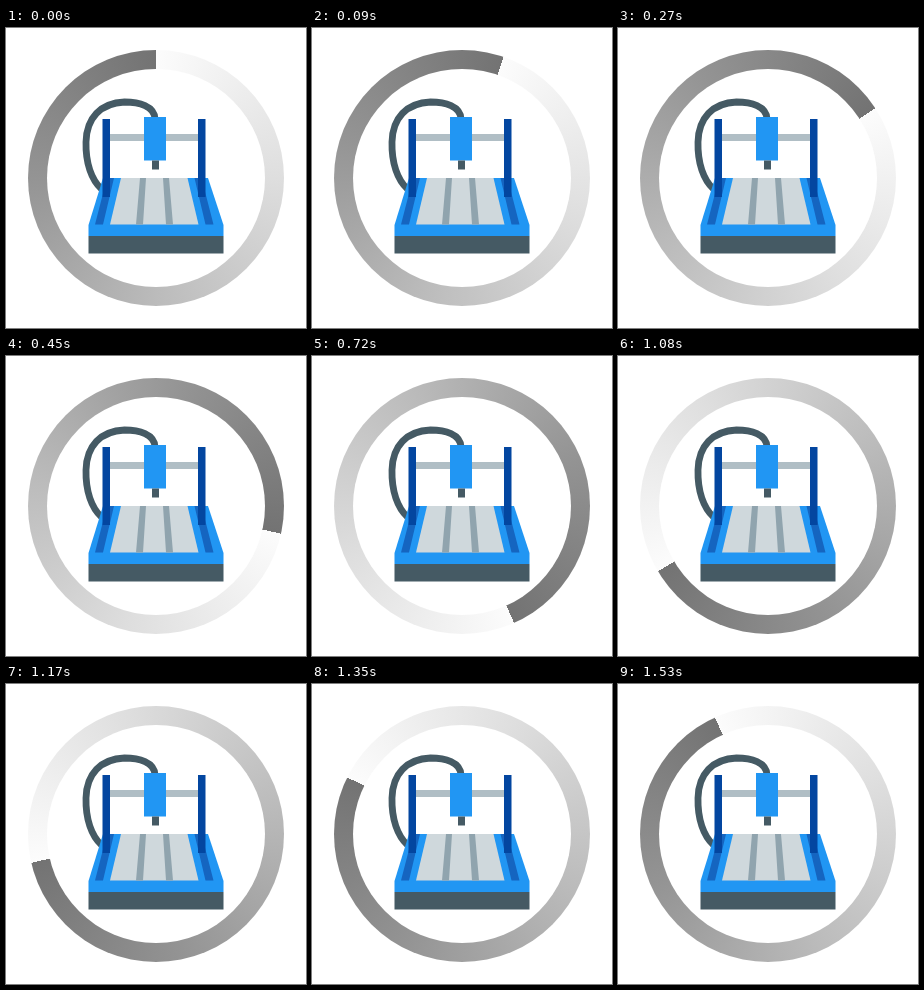
Recreate the animation shown at these times as an HTML page. Size 300 px wide and 300 px high, loop 1.62 s.

```html
<!DOCTYPE html>
<html lang="en">
<head>
<meta charset="utf-8">
<title>CNC machine loader</title>
<style>
  html, body { margin: 0; width: 100%; height: 100%; overflow: hidden; background: #fff; }
  .stage { position: relative; width: 300px; height: 300px; }
  .ring {
    position: absolute; left: 22px; top: 22px; width: 256px; height: 256px;
    border-radius: 50%;
    background: conic-gradient(from var(--head, 0deg),
      #fcfcfc, #dedede 25%, #bbb 50%, #949494 75%, #737373);
  }
  .ring::after {
    content: ""; position: absolute; inset: 19px;
    border-radius: 50%; background: #fff;
  }
  svg { position: absolute; left: 0; top: 0; }
  .steel { fill: #455a64; }
  .slot { fill: #90a4ae; }
  .blue { fill: #2196f3; }
  .shade { fill: #1565c0; }
  .post { fill: #0346a0; }
</style>
</head>
<body>
<div class="stage">
  <div class="ring" id="ring"></div>
  <svg width="300" height="300" viewBox="0 0 300 300">
    <path d="M149 91C148.500 78 133 74 118.500 74C94.500 75 80.500 90 80 114C79.500 135 85.500 152 95.500 161"
      fill="none" stroke="#455a64" stroke-width="6.8"/>
    <path fill="#b0bec5" d="M103 106h90v7h-90z"/>
    <path class="blue" d="M97 150H202L217.500 197V208H82.500V197z"/>
    <path class="shade" d="M101 150h7L97 196.500h-8zM188.500 150h7L207.500 196.500h-8z"/>
    <path fill="#cfd8dc" d="M115 150H181.500L192.500 196.500H104z"/>
    <path class="slot" d="M134 150h6L137 196.500h-7zM157 150h6L167 196.500h-7z"/>
    <path class="post" d="M96.500 91h7.500v78h-7.500zM192 91h7.500v78h-7.500z"/>
    <path class="blue" d="M138 89h22v43.500H138z"/>
    <path class="steel" d="M146 132.500h7v9h-7zM82.500 208H217.500V225.500H82.500z"/>
  </svg>
</div>
<script>
  const LOOP = 1620, STEP = 90;
  // [step, head angle in degrees]
  const keys = [[0, 0], [3, 57], [5, 102.5], [8, 156], [10, 204], [13, 257], [17, 335.5], [18, 360]];
  const ring = document.getElementById("ring");

  function headAngle(step) {
    const i = keys.findIndex(([s]) => s > step);
    const [s0, a0] = keys[i - 1], [s1, a1] = keys[i];
    return a0 + (a1 - a0) * (step - s0) / (s1 - s0);
  }

  function draw() {
    const step = Math.floor(performance.now() % LOOP / STEP);
    ring.style.setProperty("--head", headAngle(step) + "deg");
    requestAnimationFrame(draw);
  }
  draw();
</script>
</body>
</html>
```
